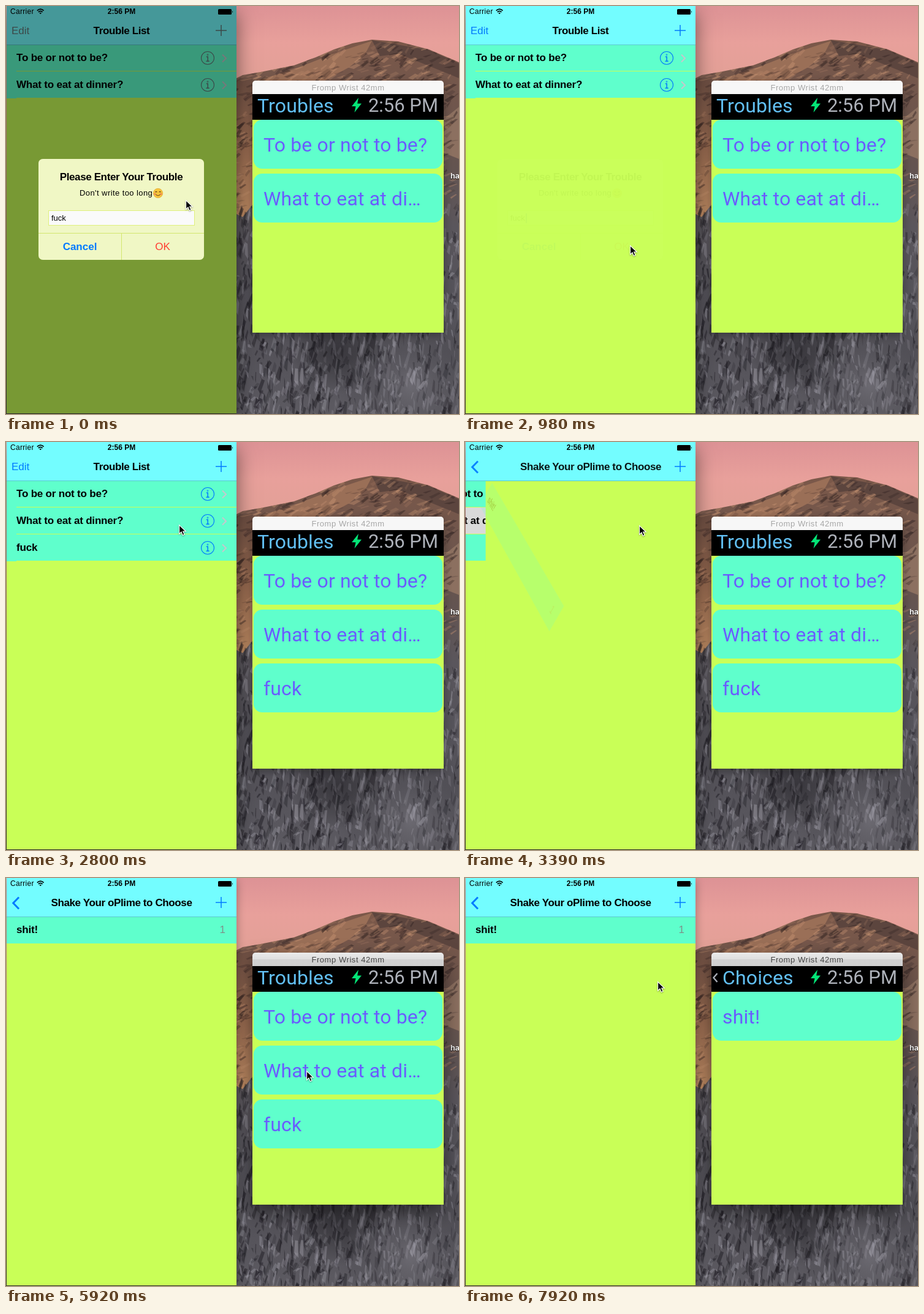
Recreate the animation shown at these times as an HTML page with a canvas. Size 739 px wide and 667 px high, loop 8000 ms.

```html
<!DOCTYPE html>
<html lang="en">
<head>
<meta charset="utf-8">
<title>Trouble List</title>
<style>
html, body { margin: 0; width: 100%; height: 100%; overflow: hidden; }
#stage { position: absolute; left: 0; top: 0; width: 739px; height: 667px; overflow: hidden;
  font: 17px "Liberation Sans", Arial, sans-serif; color: #000; --tint: #007aff; }
#stage * { position: absolute; box-sizing: border-box; }
#stage svg * { position: static; }
svg { overflow: visible; }
svg:not([fill]) { fill: none; }
.t { white-space: pre; line-height: 24px; height: 24px; margin-top: -12px; }
.c { left: 0; width: 100%; text-align: center; }
.b { font-weight: bold; letter-spacing: -.2px; }
.h { font-weight: bold; letter-spacing: -.38px; }
.tint { color: var(--tint); stroke: var(--tint); }
.fill { left: 0; top: 0; width: 100%; height: 100%; }

#phoneShadow, #phone { left: 1px; top: 0; width: 375px; height: 666px; }
#phone { overflow: hidden; background: #c9ff57; }
.page { left: 0; top: 0; width: 375px; height: 666px; background: #c9ff57; }
.cell { left: 0; width: 375px; height: 44px; background: #5fffcc; transform-origin: 0 50%; }
#list .cell::after { content: ""; position: absolute; left: 16px; right: 0; bottom: 0; height: 1px; background: #c9ff57; }
#nav { left: 0; top: 0; width: 375px; height: 64px; background: #73fdff; border-bottom: 1px solid #5cc8cc; }
#dim { background: #000; }
#alert { left: 52px; top: 250px; width: 270px; height: 165px; border-radius: 7px; background: #f0f7c5; overflow: hidden; }
#alert .line { background: #d3e76f; }
#field { left: 16px; top: 84px; width: 239px; height: 25px; background: #fafafa; border: 1px solid #dff07c; font-size: 13px; }

#watch { left: 402px; top: 122px; width: 312px; height: 412px; border-radius: 5px 5px 0 0; }
#bar { left: 0; top: 0; width: 312px; height: 22px; border-radius: 5px 5px 0 0; font-size: 13px; letter-spacing: .55px; }
#screen { left: 0; top: 22px; width: 312px; height: 390px; background: #000; overflow: hidden;
  font: 32px Roboto, "Open Sans", sans-serif; letter-spacing: .15px; }
.face { left: 0; top: 0; width: 312px; height: 390px; }
.face .head { left: 0; top: 0; width: 312px; height: 42px; background: #000; }
.face .body { left: 0; top: 42px; width: 312px; height: 348px; background: #c9ff57; }
.btn { left: 2px; width: 308px; height: 80px; border-radius: 14px; background: #5fffcc; color: #6a5cff; }
.sky { color: #62c0f4; }
#ha { left: 725px; top: 278px; font-size: 12.5px; font-weight: bold; color: #fff; text-shadow: 0 1px 2px #000; }
</style>
</head>
<body>
<div id="stage">
  <canvas id="wall" width="739" height="667"></canvas>
  <div id="ha" class="t">ha</div>
  <div id="phoneShadow"></div>
  <div id="phone">
    <div id="list" class="page"></div>
    <div id="detail" class="page">
      <div id="choice" class="cell" style="top:63px">
        <div class="t b" style="left:16px;top:22px">shit!</div>
        <div class="t" style="right:18px;top:22px;color:#7d9088">1</div>
      </div>
    </div>
    <div id="nav">
      <div class="t" style="left:6px;top:9px;font-size:12px;letter-spacing:.3px">Carrier</div>
      <svg style="left:49px;top:4px" width="13" height="10" stroke="#000" stroke-width="1.7">
        <path d="M.8 3.6Q6.2 -1.2 11.6 3.6M2.8 5.9Q6.2 2.8 9.6 5.9"/><path d="M4.4 7.4Q6.2 6 8 7.4L6.2 9.3Z" fill="#000" stroke="none"/>
      </svg>
      <div class="t c b" style="top:9px;font-size:12px;letter-spacing:0">2:56 PM</div>
      <svg style="left:345px;top:5px" width="25" height="9" fill="#000">
        <rect x="0" y="0" width="22" height="9" rx="1.5"/><path d="M23 3Q25 4.500 23 6Z"/>
      </svg>
      <div id="edit" class="t tint" style="left:8px;top:41px">Edit</div>
      <svg id="back" class="tint" style="left:9px;top:30px" width="12" height="22" stroke-width="3"><path d="M11 1.500L1.800 11L11 20.500"/></svg>
      <div id="titleA" class="t c h" style="top:41px">Trouble List</div>
      <div id="titleB" class="t c h" style="top:41px">Shake Your oPlime to Choose</div>
      <svg class="tint" style="left:341px;top:31px" width="18" height="18" stroke-width="1.500"><path d="M0 9H18M9 0V18"/></svg>
    </div>
    <div id="dim" class="fill"></div>
    <div id="alert">
      <div class="t c h" style="top:30px">Please Enter Your Trouble</div>
      <div class="t" style="left:67px;top:56px;font-size:13px;letter-spacing:.42px">Don't write too long</div>
      <svg style="left:187px;top:48px" width="16" height="16">
        <circle cx="8" cy="8" r="7.700" fill="#f7c63c" stroke="#dc9a2a" stroke-width=".6"/>
        <path d="M3.400 6.500Q5 4.300 6.300 6.500M9.700 6.500Q11 4.300 12.600 6.500M4 9.500Q8 14.500 12 9.500" stroke="#70451c" stroke-width="1.200"/>
        <circle cx="3" cy="9.300" r="1.600" fill="#f08a55"/><circle cx="13" cy="9.300" r="1.600" fill="#f08a55"/>
      </svg>
      <div id="field"><div class="t" style="left:4px;top:11.5px">fuck</div>
        <div id="caret" style="left:29px;top:4px;width:2px;height:16px;background:#426bf2"></div></div>
      <div class="line" style="left:0;top:121px;width:270px;height:1px"></div>
      <div class="line" style="left:135px;top:121px;width:1px;height:44px"></div>
      <div class="t" style="left:0;width:135px;top:144px;text-align:center;font-weight:bold;color:#007aff">Cancel</div>
      <div class="t" style="left:135px;width:135px;top:144px;text-align:center;color:#ff3b30">OK</div>
    </div>
  </div>
  <div id="watch">
    <div id="bar"><div class="t c" style="top:11.5px">Fromp Wrist 42mm</div></div>
    <div id="screen">
      <div class="face">
        <div id="choiceBody" class="body"><div class="btn" style="top:0"><div class="t" style="left:16px;top:41px">shit!</div></div></div>
        <div id="choiceHead" class="fill">
          <svg style="left:2px;top:11px" width="8" height="16" stroke="#a9adb5" stroke-width="2.400"><path d="M7.500 1L1.500 8L7.500 15"/></svg>
          <div class="t sky" style="left:18px;top:19px">Choices</div>
        </div>
      </div>
      <div id="troubles" class="face">
        <div class="head"><div class="t sky" style="left:8px;top:19px">Troubles</div></div>
        <div id="buttons" class="body"></div>
      </div>
      <svg style="left:162px;top:6px" width="16" height="24" fill="#04e577"><path d="M11 0L0 14H6.500L4.500 24L16 9.500H9.200Z"/></svg>
      <div class="t" style="right:9px;top:19px;color:#aeb2ba;font-size:31px;letter-spacing:0">2:56 PM</div>
    </div>
  </div>
  <svg id="cursor" style="left:0;top:0;filter:drop-shadow(0 1px 1px rgba(0,0,0,.35))" width="13" height="19">
    <path d="M.6 .8V15.200L4 12L6.300 17.400L9 16.200L6.700 11H11.300Z" fill="#000" stroke="#fff" stroke-width="1.100"/>
  </svg>
</div>
<script>
const $ = id => document.getElementById(id);
const clamp = v => Math.min(1, Math.max(0, v));
const span = (t, from, length) => clamp((t - from) / length);
const smooth = p => p * p * (3 - 2 * p);
const mix = (a, b, p) => a + (b - a) * p;

const troubles = ["To be or not to be?", "What to eat at dinner?", "fuck"];
const shortened = [troubles[0], "What to eat at di…", troubles[2]];
const info = `<svg class="tint" style="left:317px;top:11px" width="22" height="22">
  <circle cx="11" cy="11" r="10.500" stroke-width="1.100"/>
  <path d="M8.800 9H11.200V16M8.500 16.300H13.700" stroke-width="1.500"/><circle cx="11" cy="5.700" r="1" stroke-width=".8"/></svg>`;
const arrow = `<svg style="left:351px;top:16px" width="8" height="13" stroke="#c7c7cc" stroke-width="2"><path d="M1 .5L7 6.500L1 12.500"/></svg>`;

$("list").innerHTML = troubles.map((s, i) =>
  `<div class="cell" style="top:${63 + 44 * i}px"><div class="t b" style="left:16px;top:22px">${s}</div>${info}${arrow}</div>`).join("");
$("buttons").innerHTML = shortened.map((s, i) =>
  `<div class="btn" style="top:${88 * i}px"><div class="t" style="left:16px;top:41px">${s}</div></div>`).join("");
const cells = $("list").children, buttons = $("buttons").children;

function paintWall() {
  const g = $("wall").getContext("2d");
  let seed = 7;
  const rnd = () => (seed = seed * 16807 % 2147483647) / 2147483647;
  const ramp = (y0, y1, colors) => {
    const r = g.createLinearGradient(0, y0, 0, y1);
    colors.forEach((c, i) => r.addColorStop(i / (colors.length - 1), c));
    return r;
  };
  const shape = (points, fill) => {
    g.beginPath();
    for (let i = 0; i < points.length; i += 2) g.lineTo(points[i], points[i + 1]);
    g.closePath();
    g.fillStyle = fill;
    g.fill();
  };
  const glow = (x, y, r, color) => {
    const s = g.createRadialGradient(x, y, 0, x, y, r);
    s.addColorStop(0, color);
    s.addColorStop(1, "transparent");
    g.fillStyle = s;
    g.fillRect(x - r, y - r, 2 * r, 2 * r);
  };
  // Uneven four-sided flakes, leaning along (dx, dy).
  const flake = (x, y, dx, dy, w, color) =>
    shape([x, y, x + w, y + dy * .3 * rnd(), x + dx + w * rnd(), y + dy, x + dx - w * rnd(), y + dy * .7], color);

  g.fillStyle = ramp(0, 667, ["#e09a98", "#d08a80", "#8a6050", "#3a363c"]);
  g.fillRect(0, 0, 376, 667);
  g.fillStyle = ramp(0, 120, ["#dd9295", "#e8a09b", "#e2a096"]);
  g.fillRect(376, 0, 363, 130);
  shape([376, 118, 386, 113, 415, 108, 470, 97, 505, 84, 535, 71, 565, 61, 597, 55, 640, 58, 690, 71, 739, 92, 739, 667, 376, 667],
    ramp(55, 667, ["#7b5849", "#70564c", "#645450", "#5a565c", "#55535a", "#545259", "#5c5a61"]));
  g.save();
  g.clip();
  shape([376, 122, 402, 116, 402, 325, 386, 345, 376, 340], ramp(120, 345, ["#6f5044", "#96694f", "#bd8a62"]));
  shape([410, 122, 470, 103, 540, 76, 597, 57, 585, 80, 560, 100, 520, 122], "#9a6f57");
  shape([597, 56, 690, 72, 739, 94, 739, 118, 690, 98, 640, 78, 610, 82], "#5c453e");
  shape([714, 185, 739, 165, 739, 250, 714, 240], "#8c7060");
  for (let i = 0; i < 900; i++) {
    const x = 376 + rnd() * 363, y = 56 + rnd() * 270;
    const tone = rnd() < .55 ? "32,22,24" : "205,152,118";
    flake(x, y, -4 - rnd() * 10, 3 + rnd() * 11, 1 + rnd() * 5, `rgba(${tone},${.12 + rnd() * .3})`);
  }
  for (let i = 0; i < 1500; i++) {
    const x = 376 + rnd() * 363, y = 320 + rnd() * 347;
    const bright = .3 + .25 * (x - 376) / 363;
    const tone = rnd() > bright ? "24,22,28" : "160,158,168";
    flake(x, y, (rnd() - .6) * 8, 5 + rnd() * 26, 1 + rnd() * 4, `rgba(${tone},${.15 + rnd() * .35})`);
  }
  glow(660, 620, 120, "rgba(165,163,172,.25)");
  glow(540, 560, 75, "rgba(12,11,15,.4)");
  g.restore();
}

// Turns a cell about its left edge on a tilted axis; left runs from 1 to 0.
function tipIn(el, left) {
  const n = Math.hypot(.7, .4), ky = .7 / n, kz = .4 / n;
  const a = left * Math.PI / 2, c = Math.cos(a), s = Math.sin(a), d = 1 - c;
  const depth = [ky, ky * kz, kz * kz].map(v => -v * left / 600);
  const rows = [
    [c, kz * s, -ky * s],
    [-kz * s, c + ky * ky * d, ky * kz * d],
    [ky * s, ky * kz * d, c + kz * kz * d]
  ];
  const m = rows.flatMap(r => [...r, r.reduce((sum, v, i) => sum + v * depth[i], 0)]);
  el.style.transform = left ? `matrix3d(${m.map(v => v.toFixed(8))},0,0,0,1)` : "none";
  el.style.opacity = 1 - left;
}

// time, x, y
const path = [
  [0, 293, 317], [79, 293, 317], [80, 286, 344], [200, 286, 344], [460, 269, 391], [1560, 269, 391],
  [2060, 240, 143], [2180, 240, 143], [2320, 253, 137], [2440, 253, 137], [2800, 282, 135],
  [3149, 282, 135], [3250, 284, 136], [3980, 284, 136], [4790, 493, 313], [5690, 493, 313],
  [5920, 490, 315], [6570, 490, 315], [6820, 426, 293], [7160, 404, 278], [7780, 313, 171], [7920, 314, 169], [8000, 314, 169]
];
function moveCursor(t) {
  const i = path.findIndex(k => k[0] > t), [t0, x0, y0] = path[i - 1], [t1, x1, y1] = path[i];
  const p = smooth(span(t, t0, t1 - t0));
  $("cursor").style.transform = `translate(${mix(x0, x1, p)}px,${mix(y0, y1, p)}px)`;
}

function drawPhone(t) {
  const shown = (1 - span(t, 690, 430)) ** 3;
  $("alert").style.opacity = shown;
  $("dim").style.opacity = .4 * clamp(shown * 1.05 - .05);
  $("caret").style.opacity = t >= 230 ? 1 : 0;
  const tint = [0, 122, 255].map((v, i) => Math.round(mix(v, [100, 122, 122][i], shown)));
  $("stage").style.setProperty("--tint", `rgb(${tint})`);

  tipIn(cells[2], 1 - smooth(span(t, 1240, 800)));
  tipIn($("choice"), 1 - smooth(span(t, 3178, 800)));
  cells[1].style.background = t >= 3150 ? "#d9d9d9" : "";

  const push = 1 - (1 - span(t, 3140, 500)) ** 3.5;
  $("list").style.transform = `translateX(${-112 * push}px)`;
  $("detail").style.transform = `translateX(${375 * (1 - push)}px)`;
  $("titleA").style.transform = `translateX(${-150 * push}px)`;
  $("titleB").style.transform = `translateX(${190 * (1 - push)}px)`;
  $("titleA").style.opacity = $("edit").style.opacity = clamp(1 - 1.5 * push);
  $("titleB").style.opacity = $("back").style.opacity = push;
}

function drawWatch(t) {
  const active = t >= 5150;
  $("bar").style.background = active ? "linear-gradient(#ebebeb,#dedede 50%,#d2d2d2 52%,#d0d0d0)" : "#f7f7f7";
  $("bar").style.color = active ? "#444" : "#a6a6a6";
  const near = "0 4px 14px rgba(0,0,0,.32)", far = "0 12px 30px rgba(0,0,0,.5)";
  $("watch").style.boxShadow = active ? far : near;
  $("phoneShadow").style.boxShadow = active ? near : far;
  $("phone").style.zIndex = active ? 0 : 1;
  $("watch").style.zIndex = 2;
  $("cursor").style.zIndex = 3;
  $("watch").style.clipPath = active ? "none" : "inset(-40px -40px -40px -26px)";

  buttons[2].style.opacity = t >= 1400 ? 1 : 0;
  const press = span(t, 6380, 80) * (1 - span(t, 6520, 100));
  buttons[1].style.transform = `scale(${1 - .04 * press})`;
  buttons[1].style.opacity = 1 - .3 * press;

  const slide = smooth(span(t, 6555, 400));
  $("troubles").style.transform = `translateX(${-312 * slide}px)`;
  $("choiceHead").style.transform = `translateY(${36 * (1 - slide)}px)`;
  $("choiceHead").style.opacity = slide;
  $("choiceBody").style.opacity = smooth(span(t, 7180, 280));
}

function frame(now) {
  const t = now % 8000;
  drawPhone(t);
  drawWatch(t);
  moveCursor(t);
  requestAnimationFrame(frame);
}
paintWall();
requestAnimationFrame(frame);
</script>
</body>
</html>
```
